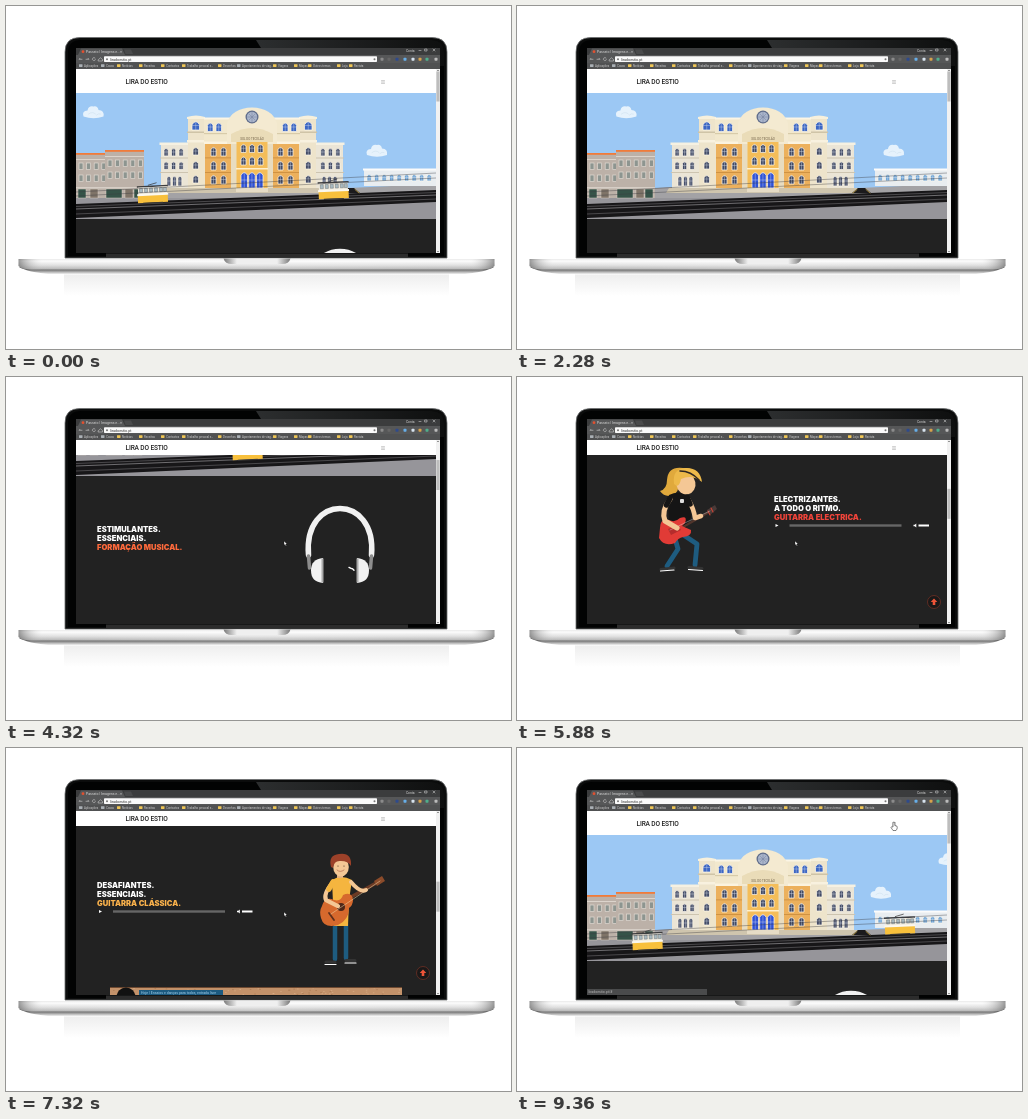
An HTML page for the animation above (9.4 s loop, 505x343 px).

```html
<!DOCTYPE html>
<html lang="pt">
<head>
<meta charset="utf-8">
<title>Lira do Estio</title>
<style>
html,body{margin:0;width:100%;height:100%;overflow:hidden;background:#fff}
svg{display:block;width:100%;height:100%}
text{font-family:Roboto,"Open Sans",sans-serif}
.big{font-family:Inter,"Liberation Sans",sans-serif;font-weight:900}
.logo{font-weight:500;letter-spacing:-.15px}
</style>
</head>
<body>
<svg id="stage" viewBox="0 0 505 343"></svg>
<script>
const LOOP = 9400;
const rect = (x, y, w, h, fill, more = '') => `<rect x="${x}" y="${y}" width="${w}" height="${h}" fill="${fill}" ${more}/>`;
const path = (d, fill, more = '') => `<path d="${d}" fill="${fill}" ${more}/>`;
const line = (d, color, w, more = '') => path(d, 'none', `stroke="${color}" stroke-width="${w}" stroke-linecap="round" stroke-linejoin="round" ${more}`);
const disc = (x, y, r, fill, more = '') => `<circle cx="${x}" cy="${y}" r="${r}" fill="${fill}" ${more}/>`;
const oval = (x, y, rx, ry, fill, more = '') => `<ellipse cx="${x}" cy="${y}" rx="${rx}" ry="${ry}" fill="${fill}" ${more}/>`;
const text = (x, y, s, size, fill, more = '') => `<text x="${x}" y="${y}" font-size="${size}" fill="${fill}" ${more}>${s}</text>`;
const group = (s, more = '') => `<g ${more}>${s}</g>`;
const shift = (x, y) => `transform="translate(${x} ${y})"`;

// A window with a pale frame, an arched head and a cross bar
const pane = (x, y, w, h, fill) =>
  path(`M${x} ${y + h}V${y + w / 2}Q${x + w / 2} ${y - w / 3} ${x + w} ${y + w / 2}V${y + h}Z`, fill, 'stroke="#fff8e8" stroke-width=".7"') +
  line(`M${x + w / 2} ${y + .5}V${y + h}M${x} ${y + h / 2}H${x + w}`, '#d9dde8', .4);
const panes = (xs, ys, w, h, fill) => xs.map(x => ys.map(y => pane(x, y, w, h, fill)).join('')).join('');

function laptop() {
  return `<defs>
  <linearGradient id="metal" x2="0" y2="1"><stop stop-color="#e6e6e6"/><stop offset=".2" stop-color="#fbfbfb"/><stop offset=".6" stop-color="#dadada"/><stop offset="1" stop-color="#a6a6a6"/></linearGradient>
  <linearGradient id="ends"><stop stop-color="#555" stop-opacity=".6"/><stop offset=".05" stop-color="#fff" stop-opacity=".15"/><stop offset=".5" stop-color="#fff" stop-opacity=".3"/><stop offset=".95" stop-color="#fff" stop-opacity=".15"/><stop offset="1" stop-color="#555" stop-opacity=".6"/></linearGradient>
  <linearGradient id="notch"><stop stop-color="#777"/><stop offset=".2" stop-color="#efefef"/><stop offset=".8" stop-color="#efefef"/><stop offset="1" stop-color="#777"/></linearGradient>
  <linearGradient id="under" x2="0" y2="1"><stop stop-color="#3a3a3a"/><stop offset=".35" stop-color="#6d6d6d"/><stop offset="1" stop-color="#fff"/></linearGradient>
  <linearGradient id="mirror" x2="0" y2="1"><stop stop-color="#ececec"/><stop offset="1" stop-color="#fff"/></linearGradient>
  <linearGradient id="gloss"><stop stop-color="#2c2e2f"/><stop offset="1" stop-color="#0e0f0f"/></linearGradient>
  <clipPath id="view"><rect x="70" y="63" width="364" height="184"/></clipPath></defs>` +
  rect(0, 0, 505, 343, '#fff') +
  rect(58, 266, 385, 24, 'url(#mirror)') +
  path('M59 252V46Q59 31.500 74 31.500H426Q441 31.500 441 46V252Z', '#0b0c0c', 'stroke="#6d6f70" stroke-width=".8"') +
  path('M62 250V47Q62 34 75 34H425Q438 34 438 47V250Z', '#020303') +
  path('M250 34H425Q438 34 438 47V60H434V42H255Z', 'url(#gloss)') +
  rect(100, 247.500, 302, 3.500, '#2c2c2c') +
  path('M13 261H488Q480 266 455 268.500H46Q21 266 13 261Z', 'url(#under)') +
  ['metal', 'ends'].map(id => path('M12.500 253H488.500V260Q486 263 476 263.500H25Q15 263 12.500 260Z', `url(#${id})`)).join('') +
  path('M217.500 252.500H284.500Q283 258 276 258H226Q219 258 217.500 252.500Z', 'url(#notch)');
}

function browser() {
  const labels = [[78, 'Aplicações'], [100, 'Casas'], [116, 'Notícias'], [138, 'Receitas'], [160, 'Contactos'],
    [181, 'Trabalho pessoal e…'], [217, 'Desenhos'], [236, 'Apontamentos de viag…'], [272, 'Viagens'], [293, 'Mapas'],
    [307, 'Outros temas'], [336, 'Loja'], [348, 'Revista']];
  const tools = [[376, '#8b8b8b'], [383, '#666'], [391, '#2e4a8c'], [399, '#67aee8'], [407, '#d7e3ee'], [414, '#d6a24b'], [421, '#4fae8b'], [430, '#bbb']];
  return rect(70, 42, 364, 21, '#3b3c3d') +
    path('M72 49L75 42.500H116L119 49Z', '#565758') + path('M119.500 48L118 43.500H125L127 48Z', '#4a4b4c') +
    disc(77, 45.700, 1.400, '#e3502f') +
    text(80, 46.900, 'Passeio | Imagens e…', 3.500, '#ddd') + text(114, 47, '×', 3.800, '#ddd') +
    text(400, 45.500, 'Conta', 3.200, '#ddd') +
    line('M413 44.500h2M419 43h2v2h-2ZM427 43l2 2M429 43l-2 2', '#ddd', .5) +
    rect(70, 49, 364, 8, '#565758') + rect(70, 57, 364, 6, '#505152') +
    line('M76 53.300h-3l1-1M80 53.300h3l-1-1M89 52a1.500 1.500 0 1 0 .4 1.500M92.500 53.500l2-1.700 2 1.700v1.500h-4Z', '#ccc', .6) +
    rect(98, 50.300, 273, 5.700, '#fafafa', 'rx=".8"') +
    disc(101, 53.200, 1, '#777') + text(104, 54.600, 'liradoestio.pt', 3.700, '#333') + disc(368.500, 53.200, 1, '#777') +
    tools.map(([x, c]) => rect(x - 1.500, 51.800, 3, 3, c, 'rx=".7"')).join('') +
    labels.map(([x, s], i) => rect(x - 5, 58.200, 3.500, 2.800, i < 2 || i === 7 ? '#aab0b5' : '#efc655', 'rx=".4"') + text(x, 60.800, s, 2.900, '#d2d2d2')).join('');
}

function school() {
  const navy = '#424b66', blue = '#3c66c4';
  const half =
    rect(155, 139, 29, 43, '#ebe5d6') + rect(153.500, 136.500, 30, 2.500, '#f6f1e2') + rect(154, 151.500, 28, 1, '#cdc4b0') + rect(154, 166, 28, 1, '#cdc4b0') +
    panes([158, 165.500, 173], [142, 155.500], 4.200, 8, navy) + panes([161, 166.500, 172], [170], 3.800, 10, navy) +
    rect(182, 113, 17, 69, '#eee4cb') + path('M181 113V111Q190 108 199 111V113Z', '#f7f0dc') + rect(181, 125.500, 18, 1.500, '#cfc4a7') + rect(181, 134, 18, 2.500, '#f8f1df') +
    pane(186, 115, 7.500, 9, blue) + panes([187], [141, 155, 169], 5.500, 8, navy) +
    rect(198, 113, 28, 25, '#f2e8cd') + rect(198, 111.500, 26, 2, '#fbf5e5') + panes([201.500, 210], [116.500], 5.500, 9, blue) + rect(198, 127, 28, 1.200, '#d8cba9') +
    rect(199, 138, 27, 44, '#ecb05c') + rect(198, 135.500, 29, 2.500, '#fbf3df') + rect(199, 151.500, 27, .8, '#c98b3d') + rect(199, 166, 27, .8, '#c98b3d') +
    panes([205, 215], [141, 155, 169], 5, 9, navy) + rect(225, 135, 6, 48, '#e8dcc0');
  return half + group(half, 'transform="translate(492 0) scale(-1 1)"') +
    path('M221 138V117Q226 102 246 101.500Q266 102 271 117V138Z', '#f4ead1') +
    path('M225 136V128Q246 116 267 128V136Z', '#eadcb8') +
    disc(246, 111, 6.500, '#5f6c8a') + disc(246, 111, 5.200, '#aab5cb') + line('M246 106.500V115.500M241.500 111H250.500M243 108L249 114M249 108L243 114', '#74819e', .5) +
    rect(230.500, 136, 31, 47, '#f4bd59') + text(246, 134.300, 'SOL DO TECELÃO', 3, '#6f5f46', 'text-anchor="middle"') +
    panes([235, 243.500, 252], [138, 150.500], 5, 8.500, navy) + rect(230, 162, 32, 1.500, '#fff0cc') +
    panes([235, 242.700, 250.500], [166], 6.500, 16, '#2f52d6') +
    path('M152 182H340L343 187H149Z', '#cfc5ae') + rect(230, 182, 32, 4, '#e6dcc6');
}

function street() {
  const house = (x, y, w, n) => rect(x, y, w, 192 - y, '#bcb1a8') + rect(x, y, w, 1.800, '#f07b3a') + rect(x, y + 6, w, 1, '#dcd4cc') +
    [10, 22].map(d => Array.from({length: n}, (_, i) => rect(x + 3 + i * 7.600, y + d, 4, 6.500, '#8d9590', 'stroke="#e0d9d2" stroke-width=".7"')).join('')).join('');
  let s = rect(70, 87, 360, 126, '#9cc8f4') + '<g id="cloudA"></g><g id="cloudB"></g>' +
    rect(70, 184, 360, 29, '#96959a') + path('M70 187L154 181L342 182L430 178V192H70Z', '#a3a2a5') +
    rect(358, 164, 72, 16, '#e9edf0') + rect(357, 162.500, 73, 2, '#fbfbfb') +
    panes([361, 368.500, 376, 383.500, 391, 398.500, 406, 413.500, 421], [168], 4.300, 7, '#6ea6d9') +
    house(70, 147, 29, 4) + house(99, 144, 39, 5) +
    rect(70, 181, 68, 1.500, '#d6cec6') +
    [72, 84, 100, 119, 128].map((x, i) => rect(x, 183, i === 2 ? 16 : 8, 9, i % 2 ? '#7f7468' : '#355348', 'stroke="#d8cfc4" stroke-width=".5"')).join('') +
    school() +
    path('M70 198L430 184V196L70 212Z', '#171618');
  for (const [y1, y2, c] of [[200.500, 186.500, '#6c6a6e'], [203, 189, '#a9a8ab'], [208, 193, '#6c6a6e']]) s += line(`M70 ${y1}L430 ${y2}`, c, .6);
  s += path('M335 187L341 182H348L354 187Z', '#1b1a1c') + line('M336 187l4-3.500M353 187l-4-3.500', '#c2a346', .8) +
    '<g id="tramUp"></g><g id="tramLow"></g>';
  for (const [y1, y2] of [[186, 167], [190, 172]]) s += line(`M70 ${y1}L430 ${y2}`, '#3c3b40', .4);
  return s;
}

const cloud = path('M-10 4.500Q-12 -1 -6 -1.500Q-5 -6.500 0 -5.500Q4 -6.500 5 -2Q11 -2 10 4.500Q0 8 -10 4.500Z', '#e6f2fc') + line('M-5 2Q-1 -1 2 2M3 3Q5 1 7 2', '#cfe1ef', .6);
const tram = rect(-15.500, -17.500, 31, 1.500, '#3d3d3e') + rect(-14.500, -16, 29, 10, '#f1ecdf') +
  [-13, -8, -3, 2, 7, 11].map(x => rect(x, -15, 3, 4, '#a9bac1', 'stroke="#5b6063" stroke-width=".4"')).join('') +
  rect(-15.500, -9.500, 31, 2, '#fbf8ef') + rect(-15, -7.500, 30, 7, '#f8c03c') + rect(-10, -.8, 20, 1.200, '#3a3835') +
  line('M-4 -18L4 -20', '#333', .7);

function headings(x, y, lines, color) {
  return lines.map((s, i) => text(x, y + i * 9, s, 7.600, i === 2 ? color : '#fff', 'class="big"')).join('');
}

function player(x, y) {
  return path(`M${x} ${y - 1.500}l3 1.500-3 1.500Z`, '#fff') + rect(x + 14, y - 1.200, 112, 2.400, '#666') +
    path(`M${x + 138} ${y - .8}h1.300l1.500-1.200v4l-1.500-1.200h-1.300Z`, '#fff') + rect(x + 143, y - 1, 10.500, 2, '#fff');
}

function phones() {
  const cup = path('M317 181Q305 182 305 193.500Q305 205 317 206Z', '#f1f1f1') + rect(315.500, 181.500, 2, 24, '#aaa') + line('M302.500 179L303.500 191', '#8d8d8d', 3.500);
  return headings(91, 155.200, ['ESTIMULANTES.', 'ESSENCIAIS.', 'FORMAÇÃO MUSICAL.'], '#ff6a3c') +
    group(line('M302.500 178C297 116 371 116 365.500 178', '#f1f1f1', 5.500) + cup + group(cup, 'transform="translate(668 0) scale(-1 1)"'), 'id="phones"') +
    group(line('M-2 -.8l2.500 1.200M1.500 .5l1.500 1.500', '#fff', 1.400), 'id="spark"');
}

function rocker() {
  const skin = '#f4c795';
  const body =
    path('M166 91Q151 89 150 103Q150 112 143 114Q148 121 156 118Q162 115 162 106L178 100Q180 91 166 91Z', '#e0a93c') +
    path('M152 118Q161 113 172 118L174 140L166 157H154Q150 135 152 118Z', '#151515') +
    oval(169, 107, 9.500, 10.500, skin, 'transform="rotate(-12 169 107)"') +
    path('M157 107Q155 92 168 91Q183 90 185 105Q175 97 164 102Q162 112 157 107Z', '#edb94a') +
    line('M163 94Q174 94 182 103', '#2c2523', 1.600) +
    rect(163, 122, 4, 4, '#ddd', 'rx="1"') +
    line('M166 150L192 135', '#51352c', 2.400) + path('M190 133L198 128L200 132L193 138Z', '#4a3a38') + line('M191 134l2 4M194 131l2 4', '#d44434', 1) +
    path('M143 151Q143 141 152 143Q158 146 163 141Q171 138 168 146L165 149L174 153Q175 159 166 160Q161 161 158 166Q147 170 142 161Z', '#e13b36') +
    path('M151 152l10-4 3 5-10 5Z', '#b52c2c') + line('M153 153L193 134', '#ddd', .4) +
    line('M153 122Q144 134 148 144L160 151', skin, 5.200) + line('M153 121L149.500 128', '#151515', 5.500) +
    line('M171 122Q177 132 178 141L184 139', skin, 4.600) + line('M170 120L173 127', '#151515', 5.500);
  return headings(257, 125.200, ['ELECTRIZANTES.', 'A TODO O RITMO.', 'GUITARRA ELECTRICA.'], '#f0443a') + player(258.500, 148.500) +
    line('', '#1e5c80', 4.800, 'id="legs"') +
    line('M144 192.500l13-1.500M172 190.500l13 1', '#333', 3) + line('M143.500 194l13.500-1M171.500 192.500l14 1', '#fff', 1.200) +
    group(body, 'id="rocker"');
}

function classic() {
  const skin = '#f4c795';
  const guitar = line('M336 154L372 134', '#6b3a24', 3.400) + path('M368 133L376 128L379 133L371 138Z', '#8b4b2a') +
    path('M316 158Q319 148 328 152Q335 154 337 147Q346 143 347 152Q347 157 343 160Q343 172 332 177Q318 181 315 170Q313 163 316 158Z', '#d6692d') +
    disc(335, 159, 4, '#4d2618') + line('M323 165l5 7', '#5d2f1c', 1.800) + line('M325 166L374 133', '#f3d9a8', .5);
  return headings(91, 140.200, ['DESAFIANTES.', 'ESSENCIAIS.', 'GUITARRA CLÁSSICA.'], '#f9b14b') + player(93, 163.500) +
    line('M329 176V211M340 176V210', '#1e5c80', 4.500) +
    line('M320 214h9M340 212.500h9', '#333', 3) + line('M319 216.500h11M339 215h11', '#fff', 1.200) +
    path('M326 132Q335 126 346 132L343 152L342 178H328Z', '#f5b53f') + rect(331, 124, 6, 6, '#e5b17e') +
    oval(335, 119, 7.800, 9.500, skin) + path('M325 119Q322 107 333 106Q346 104 345 118Q342 113 335 113Q328 112 327 120Z', '#9c4129') +
    line('M331 122Q334 125 338 122', '#b5694c', .7) + disc(332, 118, .6, '#432') + disc(338, 118, .6, '#432') +
    group(guitar + line('M345 134Q354 145 360 142', skin, 4), 'id="guitar"') +
    line('M327 134Q317 146 320 152L332 158', skin, 4.200, 'id="strum"') + line('M327 134L323 141', '#f5b53f', 5.500);
}

function board() {
  let seed = 7;
  const rnd = () => (seed = seed * 16807 % 2147483647) / 2147483647;
  let s = rect(104, 682, 292, 90, '#c3926a');
  for (let i = 0; i < 120; i++) s += rect(104 + rnd() * 290, 682 + rnd() * 12, 1.500, .7, i % 2 ? '#a97850' : '#d9ad86');
  return s + rect(104, 682, 292, 1, '#6f4a31') + disc(120, 692, 9.500, '#111') + rect(133, 685, 84, 5.500, '#1c5a80') +
    text(135, 689.300, 'Hoje | Ensaios e danças para todos, entrada livre', 3.500, '#a8d4ee');
}

const stage = document.getElementById('stage');
stage.innerHTML = laptop() + browser() + group(
  rect(70, 63, 364, 184, '#222') +
  group(street() + group(phones(), shift(0, 114)) + group(rocker(), shift(0, 301)) + group(classic(), shift(0, 443)) + board(), 'id="page"') +
  rect(70, 63, 360, 24, '#fff', 'id="head"') +
  group(text(119.500, 78.400, 'LIRA DO ESTIO', 6.600, '#222', 'class="logo"') + line('M375.500 74.600h3M375.500 76h3M375.500 77.400h3', '#aaa', .6), 'id="brand"') +
  group(disc(417, 225, 6.500, '#1a1919', 'id="disc" stroke="#7a3326" stroke-width=".7"') + path('M417 221.500l3.300 3.500h-2v3h-2.600v-3h-2Z', '#ef5438', 'id="up"'), 'id="top"') +
  group(rect(70, 241, 120, 6, '#4a4b4c') + text(71.500, 245.300, 'liradoestio.pt/#', 3.500, '#bbb'), 'id="status"') +
  rect(430, 63, 4, 184, '#f1f1f1') + rect(430.400, 65.500, 3.200, 30, '#bdbdbd', 'id="thumb"') + path('M431 65l1-1.300 1 1.300ZM431 245l1 1.300 1-1.300Z', '#555') +
  path('M0 0V4.300L1 3.400L1.800 5L2.500 4.700L1.800 3.100H3.100Z', '#fff', 'id="arrow" stroke="#111" stroke-width=".4"') +
  path('M-1 -3.500Q0 -4.500 .8 -3.500V-.5L3 .2Q3.500 .8 3 3L2 4.500H-1L-3 1.500Q-3 .3 -1 1Z', '#fff', 'id="hand" stroke="#111" stroke-width=".5"'),
  'clip-path="url(#view)"');

const el = {};
stage.querySelectorAll('[id]').forEach(n => el[n.id] = n);
el.cloudA.innerHTML = el.cloudB.innerHTML = cloud;
el.tramUp.innerHTML = el.tramLow.innerHTML = tram;

const set = (n, k, v) => n.setAttribute(k, v);
const move = (n, x, y, more = '') => set(n, 'transform', `translate(${x} ${y}) ${more}`);
const show = (n, on) => set(n, 'visibility', on ? 'visible' : 'hidden');
const clamp = v => Math.max(0, Math.min(1, v));
const wave = p => .5 - .5 * Math.cos(Math.PI * p);
const last = (starts, t) => starts.filter(s => s <= t).pop();

// Eased value from stops of [start, end, value]
function track(t, from, stops) {
  return stops.reduce((v, [a, b, to]) => v + (to - v) * wave(clamp((t - a) / (b - a))), from);
}

function draw(t) {
  const scroll = track(t, 0, [[3880, 4240, 114], [5520, 5840, 301], [6480, 6960, 443], [8360, 8640, 0]]);
  move(el.page, 0, -scroll);
  set(el.thumb, 'y', 65.5 + scroll / 6.5);
  const small = 9 * clamp(scroll / 60);
  set(el.head, 'height', 24 - small);
  move(el.brand, 0, -small * .55);

  const back = t > 8400;
  move(el.cloudA, back ? 432 + (t - 9360) * .0096 : 87.5 + t * .0096, back ? 111 : 106);
  move(el.cloudB, back ? 364 + (t - 9360) * .0026 : 371 + t * .0026, 144.500);

  const xUp = 55 + .15 * (t - last([-613, 2300, 7173], t));
  const xLow = 450 - .15 * (t - last([-813, 2933, 7233], t));
  move(el.tramUp, xUp, 203.6 - .045 * xUp, 'rotate(-2.600)');
  move(el.tramLow, xLow, 207.9 - .045 * xLow, 'rotate(-2.600)');

  const dip = t > 1960 && t < 3880 ? 8 * Math.sin(Math.PI * (t - 1960) / 640) ** 2 : 0;
  move(el.phones, 0, dip);
  const beat = Math.sin((Math.min(t, 5200) - 4320) / 110);
  move(el.spark, 345, 191.2 - Math.abs(beat) * 3, `rotate(${beat * 18})`);

  const k = wave((t - 5880) / 520);
  move(el.rocker, 4 * k, 8 * k, `rotate(${5 * k} 160 155)`);
  set(el.legs, 'd', `M${157 + k} ${158 + 7 * k}L${161 + 3 * k} ${172 + 4 * k}L150 189M${165 + k} ${157 + 7 * k}L${180 + 3 * k} ${167 + 8 * k}L178 188`);

  const sway = Math.sin((t - 7320) / 180);
  set(el.guitar, 'transform', `rotate(${sway * 2} 333 160)`);
  move(el.strum, 0, sway * 1.2);

  const hover = t >= 8080 && t < 8760;
  show(el.top, scroll > 200);
  set(el.disc, 'fill', hover ? '#f2643a' : '#1a1919');
  set(el.up, 'fill', hover ? '#fff' : '#ef5438');
  show(el.status, t >= 8080);

  const x = track(t, 432, [[2400, 2840, 278], [7720, 8080, 417], [8720, 9240, 377]]);
  const y = track(t, 150, [[2400, 2840, 164], [7720, 8080, 226], [8720, 9240, 78]]);
  const hand = hover || t >= 9200;
  move(el.arrow, x, y);
  move(el.hand, x, y);
  show(el.arrow, t >= 2400 && !hand);
  show(el.hand, hand);
}

const begin = performance.now();
function tick() {
  draw((performance.now() - begin) % LOOP);
  requestAnimationFrame(tick);
}
tick();
</script>
</body>
</html>
```
